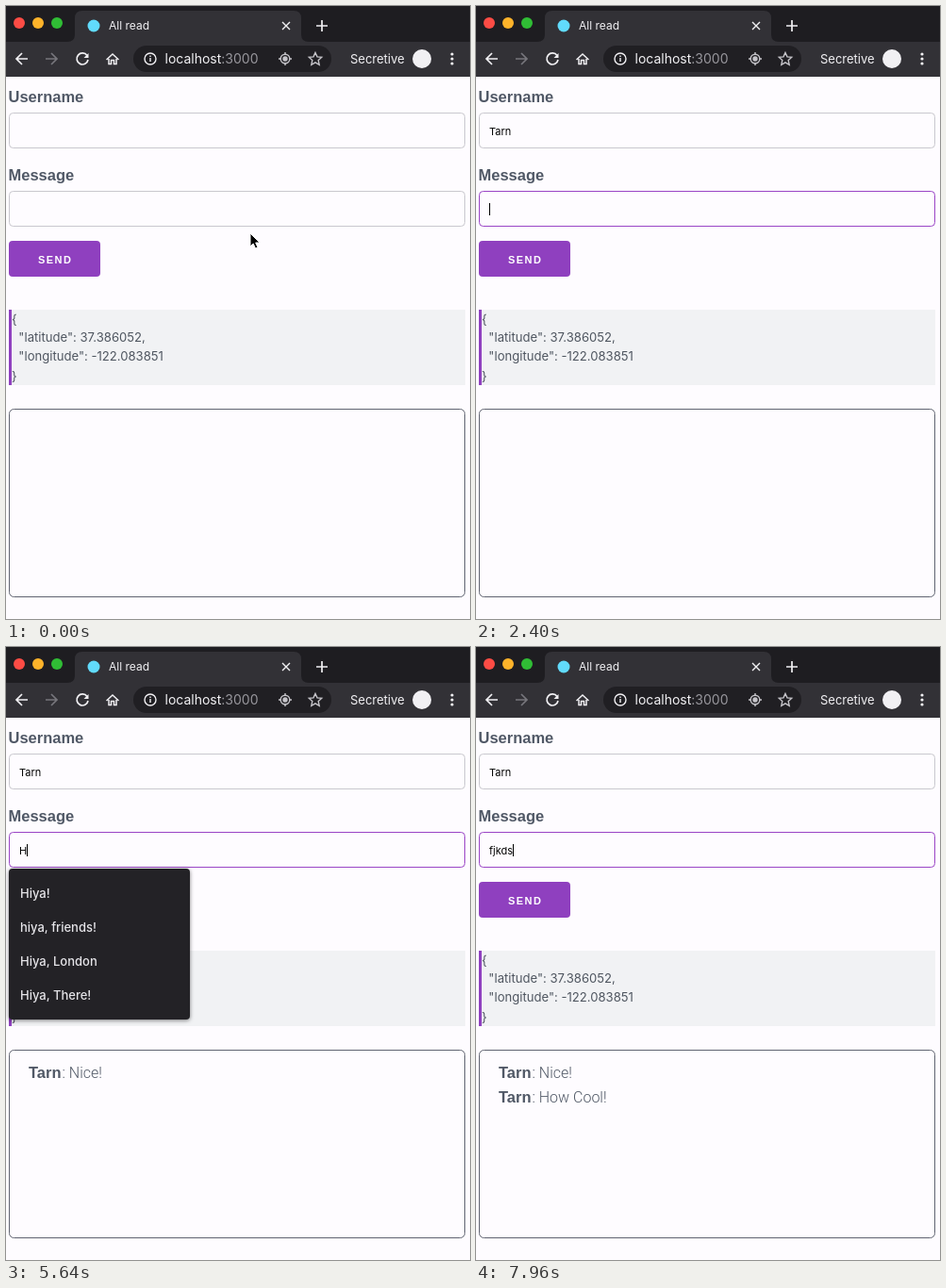
An HTML page for the animation above (8 s loop, 492 by 650 pixels).

```html
<!DOCTYPE html>
<html lang="en">
<head>
<meta charset="utf-8">
<title>All read</title>
<style>
  html, body { margin: 0; width: 100%; height: 100%; overflow: hidden; background: #fefcff; }
  svg { display: block; }
  text { white-space: pre; font-family: Inter, sans-serif; }
  .label { font: bold 16.5px "Liberation Sans", sans-serif; fill: #505866; }
  .light { font: 300 16px Roboto, sans-serif; fill: #505866; }
  .code { font: 13.1px "Liberation Mono", monospace; fill: #4f5660; }
  .send { font: bold 11px "Liberation Sans", sans-serif; letter-spacing: 1.45px; fill: #fff; }
  .typed { font-size: 11px; fill: #000; }
  .field { fill: #fefcff; stroke: #c9c8ce; }
  .field.focus { stroke: #9a45c6; }
  .menu { filter: drop-shadow(0 1px 2px rgba(0, 0, 0, .5)); }
  .menu rect { fill: #232226; }
  .menu text { font-size: 13px; font-weight: 500; fill: #e6e5e9; }
  .icon { fill: none; stroke: #f1f0f3; stroke-width: 1.7; }
</style>
</head>
<body>
<svg width="492" height="650" viewBox="0 0 492 650">
  <!-- Browser window -->
  <rect width="492" height="75" fill="#1e1d21"/>
  <path d="M0 38H65Q73 38 73 30V13Q73 5 81 5H305Q313 5 313 13V30Q313 38 321 38H492V75H0Z" fill="#323136"/>
  <circle cx="14" cy="18" r="6" fill="#fc4c45"/>
  <circle cx="34" cy="18" r="6" fill="#fdb32a"/>
  <circle cx="54" cy="18" r="6" fill="#30bd35"/>
  <circle cx="93" cy="21" r="6.5" fill="#61dafb"/>
  <text x="109" y="25" font-size="12" fill="#f1f0f3">All read</text>
  <rect x="135" y="42" width="210" height="28" rx="14" fill="#201f23"/>
  <text x="168.500" y="61" font-size="14" fill="#f1f0f3">localhost<tspan fill="#98979d">:3000</tspan></text>
  <text x="365" y="61" font-size="13" fill="#f1f0f3">Secretive</text>
  <circle cx="441" cy="56" r="10" fill="#f1f0f3"/>
  <g class="icon">
    <path d="M293 17l8 8m0-8l-8 8" stroke-width="1.4"/>
    <path d="M329 21h12m-6-6v12"/>
    <path d="M23 56H11m6-6l-6 6 6 6"/>
    <path d="M42 56h12m-6-6l6 6-6 6" stroke="#77767c"/>
    <path d="M86 52.500a6 6 0 1 0 1 4.500"/>
    <path d="M87.500 50v5h-5z" fill="#f1f0f3" stroke="none"/>
    <path d="M106.500 57l6.500-6 6.500 6M109 56v5.500h2.500v-4h3v4h2.500V56" stroke-width="1.5"/>
    <circle cx="153" cy="56" r="6" stroke-width="1.4"/>
    <path d="M153 55v4m0-6.500v1.500" stroke-width="1.4"/>
    <g stroke="#c6c5ca" stroke-width="1.4">
      <circle cx="296" cy="56" r="4.800"/>
      <circle cx="296" cy="56" r="2" fill="#c6c5ca"/>
      <path d="M296 49v2m0 10v2m-7-7h2m10 0h2"/>
      <path d="M328 49.500l2 4.400 4.700.5-3.500 3.200 1 4.700-4.200-2.400-4.200 2.400 1-4.700-3.500-3.200 4.700-.5z"/>
    </g>
  </g>
  <g fill="#f1f0f3">
    <circle cx="473" cy="51" r="1.600"/><circle cx="473" cy="56" r="1.600"/><circle cx="473" cy="61" r="1.600"/>
  </g>

  <!-- Page -->
  <text class="label" x="2.500" y="102">Username</text>
  <rect class="field" x="3.500" y="113.500" width="483" height="37" rx="4"/>
  <text class="typed" x="14" y="137"></text>
  <text class="label" x="2.500" y="185">Message</text>
  <rect class="field" x="3.500" y="196.500" width="483" height="37" rx="4"/>
  <text class="typed" x="14" y="220"></text>
  <rect id="caret" width="1" height="13"/>
  <rect x="3" y="249" width="97" height="38" rx="4" fill="#8f40bf"/>
  <text class="send" x="34" y="273">SEND</text>
  <rect x="3" y="322" width="484" height="80" fill="#f1f2f4"/>
  <rect x="3" y="322" width="3" height="80" fill="#8f40bf"/>
  <g class="code">
    <text x="6" y="337">{</text>
    <text x="6" y="356">  "latitude": 37.386052,</text>
    <text x="6" y="376">  "longitude": -122.083851</text>
    <text x="6" y="397">}</text>
  </g>
  <rect x="3.500" y="427.500" width="483" height="199" rx="5" fill="none" stroke="#606471"/>
  <g class="post"><text class="label" x="24" y="457">Tarn</text><text class="light" x="59.500" y="457">: Nice!</text></g>
  <g class="post"><text class="label" x="24" y="483">Tarn</text><text class="light" x="59.500" y="483">: How Cool!</text></g>
  <g class="menu"></g>
  <g class="menu"></g>

  <!-- Pointer, with its hot spot at 0,0 -->
  <g id="pointer">
    <circle id="ring" r="16.300" fill="#fefcff" stroke="#111" stroke-width="1.500"/>
    <path id="beam" d="M-3-7Q0-7 0-5Q0-7 3-7M0-5V5M-3 7Q0 7 0 5Q0 7 3 7M-2 1H2" fill="none" stroke="#111" stroke-width="1.200"/>
    <path id="arrow" d="M0 0V14L3.200 11 5.500 16 8 15 5.700 10H10Z" stroke="#fff"/>
  </g>
</svg>
<script>
const LOOP = 8000, CLICK = 640;
const all = s => [...document.querySelectorAll(s)];
const byId = id => document.getElementById(id);
const show = (el, on) => el.style.display = on ? '' : 'none';
const clamp = v => Math.max(0, Math.min(1, v));

const fields = all('.field'), typed = all('.typed'), posts = all('.post'), menus = all('.menu');
const caret = byId('caret'), pointer = byId('pointer');
const ring = byId('ring'), beam = byId('beam'), arrow = byId('arrow');

// [time, field, text in that field]
const edits = [
  [CLICK, 0, ''], [1560, 0, 'T'], [1720, 0, 'Ta'], [1840, 0, 'Tar'], [2000, 0, 'Tarn'],
  [2360, 1, ''], [2960, 1, 'N'], [3120, 1, 'Ni'], [3280, 1, 'Nic'], [3560, 1, 'Nice'], [4760, 1, 'Nice!'],
  [5000, 1, ''], [5520, 1, 'H'], [5800, 1, 'Ho'], [6000, 1, 'How'], [6240, 1, 'How '], [6320, 1, 'How C'],
  [6480, 1, 'How Co'], [6600, 1, 'How Coo'], [6720, 1, 'How Cool'], [7000, 1, 'How Cool!'],
  [7160, 1, ''], [7840, 1, 'f'], [7880, 1, 'fj'], [7920, 1, 'fjk'], [7960, 1, 'fjkds']
];
const postTimes = [5040, 7200];
const menuTimes = [[CLICK, 1560], [5560, 5800]];

function buildMenu(menu, top, items) {
  menu.innerHTML = `<rect x="3" y="${top}" width="192" height="${16 + 36 * items.length}" rx="4"/>` +
    items.map((s, i) => `<text x="15" y="${top + 31 + 36 * i}">${s}</text>`).join('');
}
buildMenu(menus[0], 152, ['milobrants', 'xyz789', 'xyz', 'rowantelby', 'howdy', 'dorn']);
buildMenu(menus[1], 235, ['Hiya!', 'hiya, friends!', 'Hiya, London', 'Hiya, There!']);

function drawFields(t) {
  const values = ['', ''];
  let last;
  for (const edit of edits) if (edit[0] <= t) {
    last = edit;
    values[edit[1]] = edit[2];
  }
  typed.forEach((el, i) => el.textContent = values[i]);
  fields.forEach((el, i) => el.classList.toggle('focus', !!last && last[1] === i));
  show(caret, last && (t - last[0]) % 900 < 500);
  if (last) {
    const width = typed[last[1]].getComputedTextLength();
    caret.setAttribute('x', Math.round(14 + width));
    caret.setAttribute('y', 126 + 83 * last[1]);
  }
}

function drawPointer(t) {
  const p = clamp(t / 560), k = p * p * (3 - 2 * p);
  const x = 259 - 199 * k, y = 241 - 115 * k;
  const overField = (y > 113 && y < 151) || (y > 196 && y < 234);
  pointer.setAttribute('transform', `translate(${x} ${y})`);
  show(pointer, t < 1560);
  show(ring, t >= 560 && t < 720);
  show(beam, overField);
  show(arrow, !overField);
}

function draw(now) {
  const t = now % LOOP;
  drawFields(t);
  drawPointer(t);
  posts.forEach((el, i) => show(el, t >= postTimes[i]));
  menus.forEach((el, i) => {
    const [open, close] = menuTimes[i];
    const alpha = t < open ? 0 : clamp(1 - (t - close) / 200);
    show(el, alpha > 0);
    el.style.opacity = alpha;
  });
  requestAnimationFrame(draw);
}
requestAnimationFrame(draw);
</script>
</body>
</html>
```
